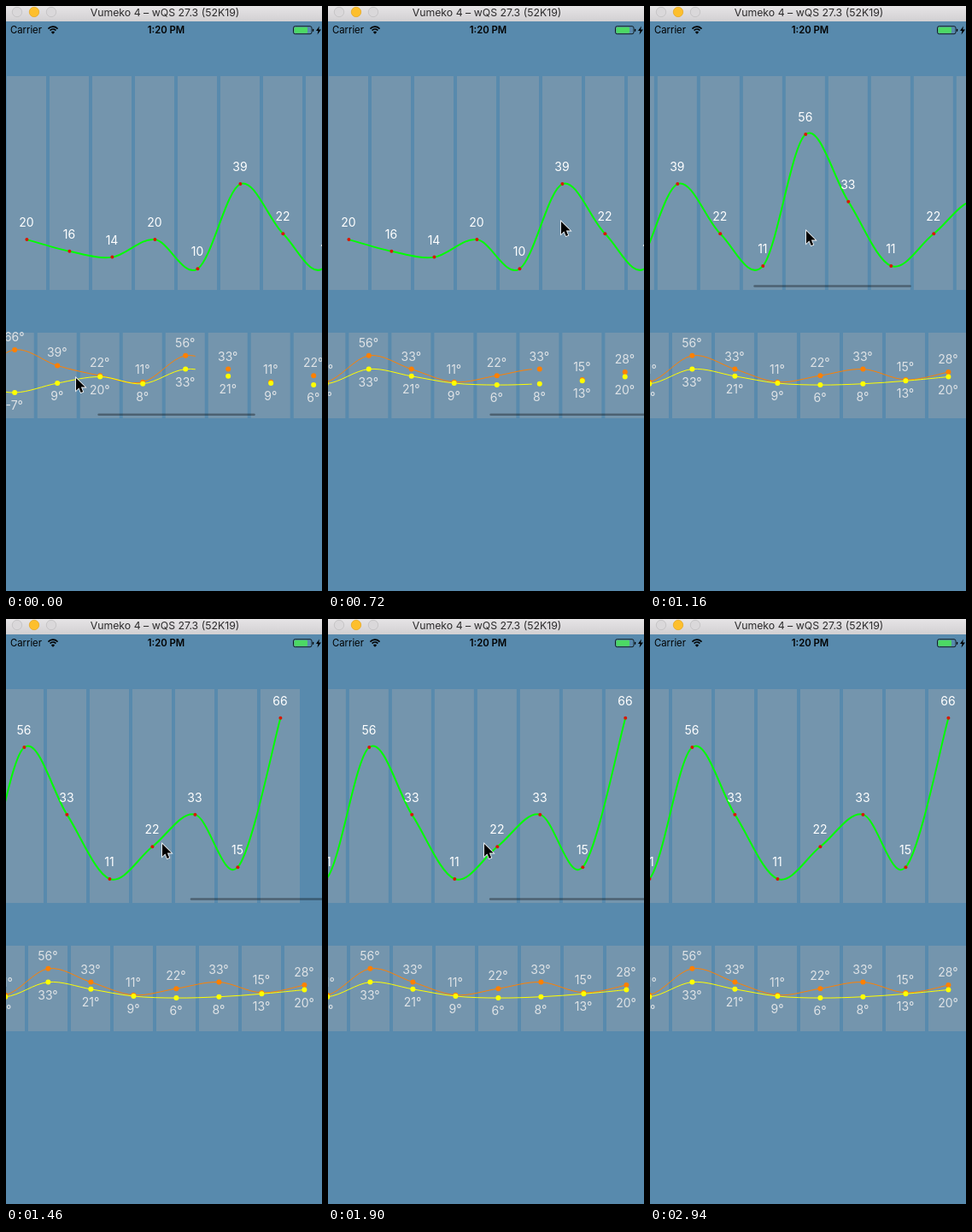
Write an HTML page with a canvas that moves like this. It is 370 px wide and 684 px high and loops after 3380 ms.

```html
<!DOCTYPE html>
<html lang="en">
<head>
<meta charset="utf-8">
<title>Scrolling line charts</title>
<style>
html, body { margin: 0; width: 100%; height: 100%; overflow: hidden; background: #588aad; }
canvas { display: block; width: 370px; height: 684px; }
</style>
</head>
<body>
<canvas id="stage"></canvas>
<script>
const WIDTH = 370, HEIGHT = 684, LOOP = 3380;
const TICK = 147, LAST_TICK = 20;   // the screen refreshes once per tick (ms)
const MAX_SCROLL = 375, PITCH = 50;

const canvas = document.getElementById('stage');
const ctx = canvas.getContext('2d');
const ratio = window.devicePixelRatio || 1;
canvas.width = WIDTH * ratio;
canvas.height = HEIGHT * ratio;

const UPPER = [20, 16, 14, 20, 10, 39, 22, 11, 56, 33, 11, 22, 33, 15, 66];
const HIGHS = Object.assign([...UPPER], { 4: 66, 14: 28 });
const LOWS = [12, 8, 6, 5, -7, 9, 20, 8, 33, 21, 9, 6, 8, 13, 20];

const POINTER_START = { x: 82, y: 434 };
const POINTER_MOVES = [
  { from: 60, to: 294, x: 248, y: 309 },
  { from: 441, to: 680, x: 273, y: 251 },
  { from: 790, to: 1060, x: 183, y: 262 },
  { from: 1911, to: 2160, x: 184, y: 454 },
  { from: 2240, to: 2720, x: 259, y: 661 },
];

const cellX = i => 1 + PITCH * i;
const labelX = i => 24 + PITCH * i;
const pointX = i => 24.4 + PITCH * i;
const upperY = v => 341.5 - 3.42 * v;
const lowerY = v => 447.2 - 0.685 * v;

const clamp = v => Math.min(Math.max(v, 0), 1);
const ramp = (t, from, to) => clamp((t - from) / (to - from));
const ease = u => u * u * (3 - 2 * u);

// A flick past the end of the content, then a critically damped spring back.
function flick(time, start, peak, reach) {
  if (time <= peak) return reach * ease(ramp(time, start, peak));
  const x = (time - peak) / 88;
  return MAX_SCROLL + (reach - MAX_SCROLL) * (1 + x) * Math.exp(-x);
}

function text(str, x, y, size, color, align = 'center', weight = 400) {
  ctx.font = `${weight} ${size}px Inter, Roboto, sans-serif`;
  ctx.textAlign = align;
  ctx.fillStyle = color;
  ctx.fillText(str, x, y);
}

function dot(x, y, radius, color) {
  ctx.beginPath();
  ctx.arc(x, y, radius, 0, 2 * Math.PI);
  ctx.fillStyle = color;
  ctx.fill();
}

function box(x, y, w, h, radius, color) {
  ctx.beginPath();
  ctx.roundRect(x, y, w, h, radius);
  ctx.fillStyle = color;
  ctx.fill();
}

// Catmull-Rom spline; the handles at both ends are half as long.
function curve(values, toY, color, width) {
  const points = values.map((v, i) => [pointX(i), toY(v)]);
  const handle = (i, sign) => {
    const before = points[i - 1] || points[i], after = points[i + 1] || points[i];
    return points[i].map((p, axis) => p + sign * (after[axis] - before[axis]) / 6);
  };
  ctx.beginPath();
  ctx.moveTo(...points[0]);
  for (let i = 1; i < points.length; i++) {
    ctx.bezierCurveTo(...handle(i - 1, 1), ...handle(i, -1), ...points[i]);
  }
  ctx.strokeStyle = color;
  ctx.lineWidth = width;
  ctx.stroke();
}

function cells(top, height) {
  ctx.fillStyle = '#7495ad';
  UPPER.forEach((_, i) => ctx.fillRect(cellX(i), top, 46, height));
}

function scrollBar(scroll, y, opacity) {
  const inside = Math.min(scroll, MAX_SCROLL) / 2;
  const excess = Math.max(scroll - MAX_SCROLL, 0);
  box(inside + excess + 0.2, y, 184.5 - excess, 2.5, 1.25, `rgba(0, 0, 0, ${0.35 * opacity})`);
}

function upperChart(time) {
  const scroll = flick(time, 790, 1470, 403);
  ctx.save();
  ctx.translate(-scroll, 0);
  cells(82, 250);
  curve(UPPER, upperY, '#00ff00', 2);
  UPPER.forEach((v, i) => {
    dot(pointX(i), upperY(v), 2, '#d81800');
    text(v, labelX(i), upperY(v) - 15, 14, '#fff');
  });
  ctx.restore();
  scrollBar(scroll, 326.3, Math.min(ramp(time, 735, 882), ramp(time, 2205, 1911)));
}

function lowerChart(time) {
  const scroll = flick(time, -306, 294, 416);
  ctx.save();
  ctx.translate(-scroll, 0);
  cells(382, 100);
  ctx.save();
  ctx.beginPath();
  ctx.rect(0, 382, 436 + 0.244 * time, 100);
  ctx.clip();
  curve(HIGHS, lowerY, '#ff8000', 1);
  curve(LOWS, lowerY, '#ffff00', 1);
  ctx.restore();
  HIGHS.forEach((high, i) => {
    const low = LOWS[i];
    dot(pointX(i), lowerY(high), 3, '#ff8000');
    dot(pointX(i), lowerY(low), 3, '#ffff00');
    text(high + '°', labelX(i), lowerY(high) - 10, 14, '#dfe3e6');
    text(low + '°', labelX(i), lowerY(low) + 20, 14, '#dfe3e6');
  });
  ctx.restore();
  scrollBar(scroll, 476.4, ramp(time, 1176, 735));
}

function titleBar() {
  const shade = ctx.createLinearGradient(0, 0, 0, 18);
  shade.addColorStop(0, '#e6e4e6');
  shade.addColorStop(1, '#d2d0d2');
  ctx.fillStyle = shade;
  ctx.fillRect(0, 0, WIDTH, 18);
  ['#dad8da', '#fdbf2d', '#dad8da'].forEach((color, i) => {
    dot(13 + 20 * i, 7, 5.7, color);
    ctx.strokeStyle = i === 1 ? '#e5a928' : '#c1bfc1';
    ctx.lineWidth = 0.8;
    ctx.stroke();
  });
  text('Vumeko 4 – wQS 27.3 (52K19)', 186, 11.7, 12.3, '#2c2b2c');
}

function statusBar() {
  text('Carrier', 5, 32, 11.3, '#000', 'left');
  text('1:20 PM', 187.5, 32, 11.3, '#000', 'center', 600);

  ctx.strokeStyle = '#000';
  ctx.lineWidth = 1.7;
  for (const radius of [4.6, 7.6]) {
    ctx.beginPath();
    ctx.arc(55, 31.8, radius, -Math.PI * 0.76, -Math.PI * 0.24);
    ctx.stroke();
  }
  ctx.fillStyle = '#000';
  ctx.beginPath();
  ctx.moveTo(55, 32.8);
  ctx.arc(55, 32.8, 3, -Math.PI * 0.75, -Math.PI * 0.25);
  ctx.fill();

  ctx.lineWidth = 0.8;
  ctx.beginPath();
  ctx.roundRect(336.5, 23.7, 21.5, 9, 2);
  ctx.stroke();
  box(337.5, 24.7, 15.5, 7, 1, '#4cd964');
  box(359, 26.7, 1.2, 3, 0.5, '#000');
  ctx.fillStyle = '#000';
  ctx.fill(new Path2D('M367 23.5L363 29h2.5l-1 4.5L369 27.5h-2.8z'));
}

const arrow = new Path2D('M0 1v14.7l3.4-3.2 2.3 5.5 2.5-1-2.3-5.4h4.8z');

function pointer(time) {
  if (time >= TICK * LAST_TICK) return;
  let { x, y } = POINTER_START;
  for (const move of POINTER_MOVES) {
    const part = ease(ramp(time, move.from, move.to));
    x += (move.x - x) * part;
    y += (move.y - y) * part;
  }
  ctx.save();
  ctx.translate(x, y);
  ctx.lineWidth = 1.6;
  ctx.strokeStyle = '#fff';
  ctx.stroke(arrow);
  ctx.fillStyle = '#000';
  ctx.fill(arrow);
  ctx.restore();
}

function draw(now) {
  // Each refresh comes slightly ahead of its tick.
  const time = TICK * Math.min(Math.floor((now % LOOP + 19) / TICK), LAST_TICK);
  ctx.setTransform(ratio, 0, 0, ratio, 0, 0);
  ctx.fillStyle = '#588aad';
  ctx.fillRect(0, 0, WIDTH, HEIGHT);
  titleBar();
  statusBar();
  upperChart(time);
  lowerChart(time);
  pointer(time);
}

const start = performance.now();
function loop() {
  draw(performance.now() - start);
  requestAnimationFrame(loop);
}
loop();
</script>
</body>
</html>
```
